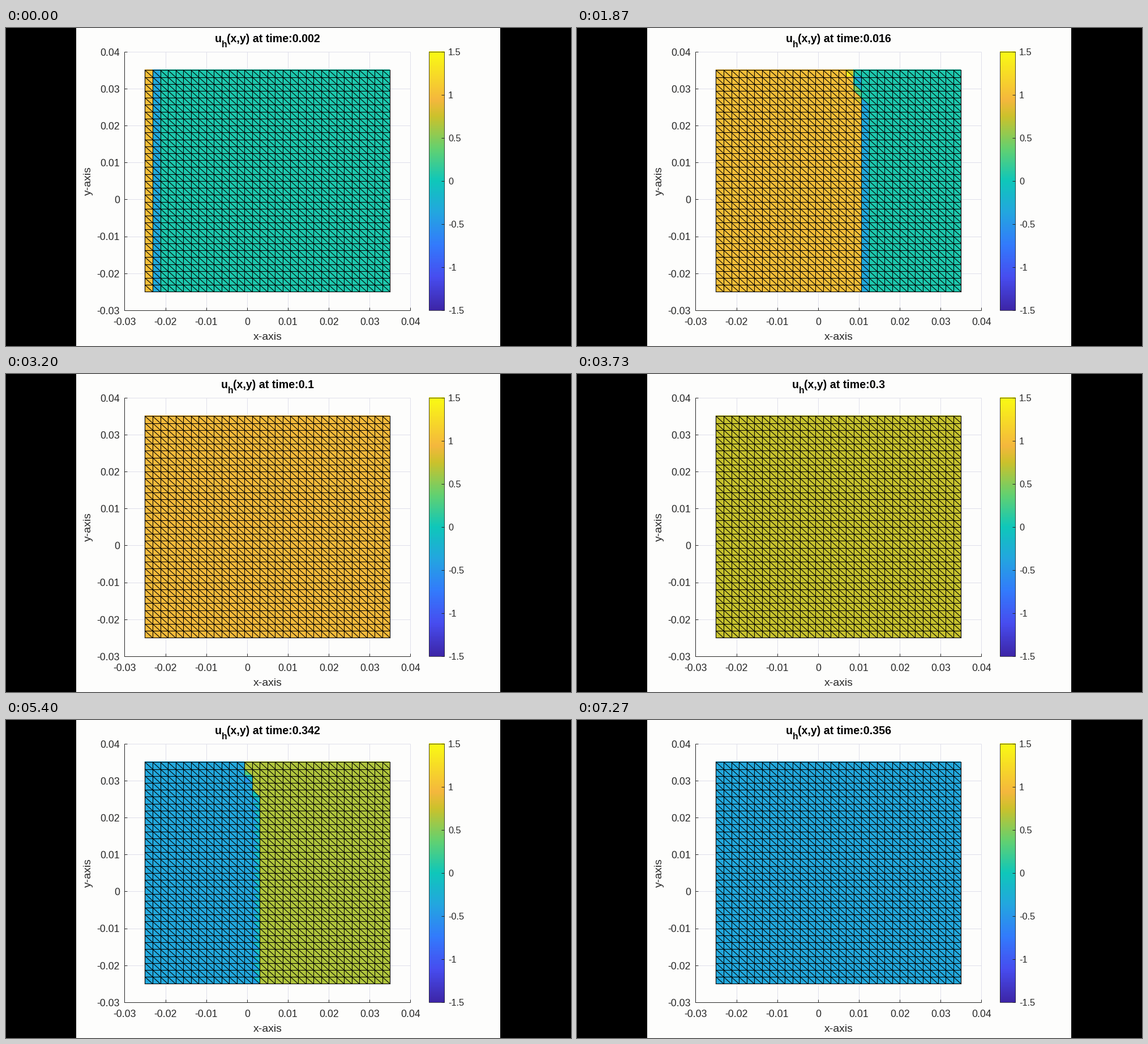
Write a matplotlib script that moves like this. It is 998x561 px and loops after 7460 ms.

```python
import numpy as np
import matplotlib.pyplot as plt
from matplotlib.animation import FuncAnimation
from matplotlib.collections import LineCollection
from matplotlib.colors import LinearSegmentedColormap
from matplotlib.patches import Rectangle

W, H, DPI = 998, 561, 100
LOOP, STEP = 7460, 20          # ms
HOLD = 800 / 3                 # ms per solution step
LAST = 27                      # index of the final solution step
N = 32                         # mesh cells per side
PX = 72 / DPI                  # one pixel in points
INK = "#262626"

plt.rcParams["font.family"] = "Liberation Sans"

cmap = LinearSegmentedColormap.from_list("sea_to_sun", [
    (0, (.24, .15, .66)), (.125, (.28, .30, .94)), (.25, (.20, .48, .99)),
    (.375, (.14, .65, .88)), (.5, (.06, .78, .73)), (.625, (.39, .82, .44)),
    (.75, (.80, .76, .17)), (.815, (.96, .72, .24)), (1, (.98, .98, .08))])


def clock(k):
    """Solution time: forward wave, slow decay, then the backward wave."""
    if k < 12:
        return .002 * (k + 1)
    return .1 * (k - 11) if k < 15 else .332 + .002 * (k - 15)


# Triangles of every cell: 0 lower left, 1 upper right
upper = np.array([0, 1])
rows = np.arange(N)[:, None, None] + (2 - upper) / 3
cols = np.arange(N)[None, :, None]


def wave(p, depth, behind, ahead, edge):
    """Front at column p, held back near the upper wall."""
    lag = depth * np.clip(1 - rows / 5, 0, 1)
    s = p - lag - cols
    return np.where(s >= 1, behind, np.where(s >= 0, edge(s), ahead))


def solve(k):
    level = np.cos(2.5 * clock(k))
    if k < 12:
        p = 1.1 + 2.465 * k + .015 * k * k
        return wave(p, min(2, (p / 17) ** 2), level, .06,
                    lambda s: np.clip(1.9 * (s - .25 * upper) - .5, -.35, 1.4))
    p = max(0, 14.75 + 3.04 * (k - 20)) if k >= 15 else -1
    return wave(p, np.clip(p / 8, 0, 2), -.35, level,
                lambda s: np.clip(2.4 - 3.33 * (s + .1 * (1 - upper)), -.5, level))


def X(v):
    return 209.4 + (v + .03) * 505 / .07


def Y(v):
    return 498 - (v + .03) * 456.2 / .07


fig = plt.figure(figsize=(W / DPI, H / DPI), dpi=DPI, facecolor="black")
ax = fig.add_axes([0, 0, 1, 1])
ax.axis("off")


def line(x, y, color=INK, z=1):
    ax.plot(x, y, color=color, lw=PX, zorder=z, solid_capstyle="butt")


def put(x, y, s, size, ha="center", **kw):
    """Text on baseline y, size in pixels."""
    return ax.text(x, y, s, size=size * PX, ha=ha, va="baseline",
                   rotation_mode="anchor", **{"color": INK, **kw})


ax.add_patch(Rectangle((124, 0), 749, H, fc="#fdfdfc", ec="none", zorder=0))

# Plot frame, grid and ticks
x0, x1, y0, y1 = X(-.03), X(.04), Y(-.03), Y(.04)
TICK = 17.6
for i in range(-3, 5):
    v = i / 100
    line([X(v)] * 2, [y0, y1], "#dfdfea")
    line([x0, x1], [Y(v)] * 2, "#dfdfea")
    line([X(v)] * 2, [y0, y0 - 5], z=2)
    line([x0, x0 + 5], [Y(v)] * 2, z=2)
    put(X(v), 524.5, f"{v:g}", TICK)
    put(201, Y(v) + 6.7, f"{v:g}", TICK, "right")
line([x0, x0, x1], [y1, y0, y0], z=2)
put(462, 550, "x-axis", 19.4)
put(149.5, 270, "y-axis", 19.4, rotation=90)

# Colour bar
ax.imshow(np.linspace(1, 0, 256)[:, None], cmap=cmap, aspect="auto",
          extent=(747, 774.5, y0, y1), zorder=2)
ax.add_patch(Rectangle((747, y1), 27.5, y0 - y1, fc="none", ec=INK,
                       lw=.8 * PX, zorder=3))
for i in range(-3, 4):
    y = y1 + (3 - i) * (y0 - y1) / 6
    line([769.5, 774.5], [y, y], z=3)
    put(781, y + 6, f"{i / 2:g}", 16.2, "left")

# Triangulated field
mx0, mx1, my0, my1 = X(-.025), X(.035), Y(.035), Y(-.025)
gx = (np.arange(434) + .5) * N / 434
gy = ((np.arange(392) + .5) * N / 392)[:, None]
col, row = gx.astype(int), gy.astype(int)
side = ((gy - row) < (gx - col)).astype(int)
field = ax.imshow(np.zeros((392, 434)), cmap=cmap, vmin=-1.5, vmax=1.5,
                  extent=(mx0, mx1, my1, my0), interpolation="nearest",
                  aspect="auto", zorder=4)

xs, ys = np.linspace(mx0, mx1, N + 1), np.linspace(my0, my1, N + 1)
mesh = [[(x, my0), (x, my1)] for x in xs] + [[(mx0, y), (mx1, y)] for y in ys]
mesh += [[(xs[0], ys[i]), (xs[N - i], ys[N])] for i in range(N)]
mesh += [[(xs[i], ys[0]), (xs[N], ys[N - i])] for i in range(1, N)]
ax.add_collection(LineCollection(mesh, colors="black", linewidths=1.1 * PX,
                                 capstyle="projecting", zorder=5))

# Title with a lowered index
EM = 19.6
bold = dict(ha="left", weight="bold", color="black")
head = put(0, 24.5, "u", EM, **bold)
index = put(0, 34, "h", .8 * EM, **bold)
tail = put(0, 24.5, "", EM, **bold)

ax.set_xlim(0, W)
ax.set_ylim(H, 0)


def update(i):
    k = min(int((i + 1) * STEP / HOLD), LAST)
    field.set_data(solve(k)[row, col, side])
    label = f"{clock(k):.4g}"
    tail.set_text(f"(x,y) at time:{label}")
    left = 461.8 - EM * (6.99 + .278 + .556 * (len(label) - 1)) / 2
    head.set_x(left)
    index.set_x(left + .611 * EM)
    tail.set_x(left + 1.1 * EM)
    return field, head, index, tail


anim = FuncAnimation(fig, update, frames=LOOP // STEP, interval=STEP,
                     repeat=True, repeat_delay=0)
plt.show()
```
